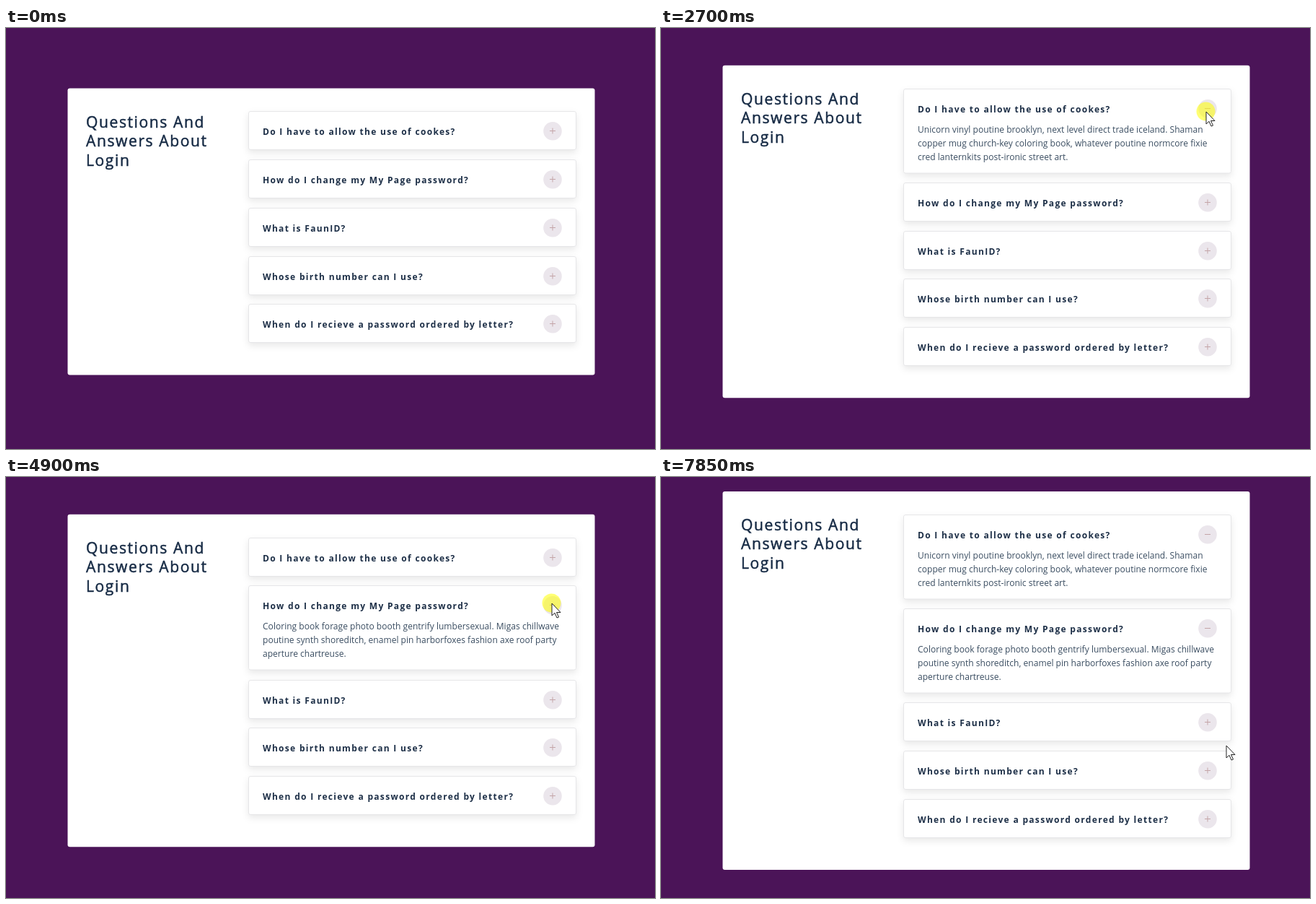
Recreate the animation shown at these times as an HTML page. Size 900 px wide and 583 px high, loop 8 s.

```html
<!DOCTYPE html>
<html lang="en">
<head>
<meta charset="utf-8">
<title>Login questions</title>
<style>
  html, body { margin: 0; width: 100%; height: 100%; overflow: hidden; background: #4b1458; }
  svg { display: block; font-family: "Open Sans", "Noto Sans", sans-serif; }
  text { white-space: pre; }
  .title { font-size: 21px; letter-spacing: 1.62px; fill: #172b45; stroke: #172b45; stroke-width: .5; }
  .question { font-size: 12px; font-weight: 700; letter-spacing: 1.31px; fill: #1d2f47; }
  .answer { font-size: 12px; letter-spacing: .03px; fill: #3a4d61; }
  .box { fill: #fff; stroke: #e6e6e8; filter: drop-shadow(0 4px 5px rgba(0, 0, 0, .09)); }
  .button { fill: #ebe6ec; }
  .sign { fill: none; stroke: #c4a5a8; }
  .cursor { fill: #fff; stroke: #222; stroke-linejoin: round; }
</style>
</head>
<body>
<svg id="stage" width="900" height="583" viewBox="0 0 900 583"></svg>
<script>
const LOOP = 8000, STEP = 50;
const MOVE_TIME = 200, PRESS_TIME = 100;
const PITCH = 66.75, GROWTH = 63.5;
const BUTTON = { x: 758, y: 27.3, r: 12.8 };

const questions = [
  ["Do I have to allow the use of cookes?",
    "Unicorn vinyl poutine brooklyn, next level direct trade iceland. Shaman",
    "copper mug church-key coloring book, whatever poutine normcore fixie",
    "cred lanternkits post-ironic street art."],
  ["How do I change my My Page password?",
    "Coloring book forage photo booth gentrify lumbersexual. Migas chillwave",
    "poutine synth shoreditch, enamel pin harborfoxes fashion axe roof party",
    "aperture chartreuse."],
  ["What is FaunID?"],
  ["Whose birth number can I use?"],
  ["When do I recieve a password ordered by letter?"],
];

// each move starts at a time and eases to a point
const entry = { time: 250, x: 796, y: 282 };
const moves = [
  [250, 780, 166], [700, 767, 130], [1000, 765, 138], [1950, 756, 116],
  [2900, 763, 183], [3300, 762, 210], [3700, 758, 198], [4350, 757, 175],
  [5150, 754, 135], [6150, 765, 212], [6400, 763, 230], [6650, 762, 236],
  [7300, 796, 371], [7650, 784, 372],
];
const presses = [1450, 2650, 3850, 4850, 5800, 6950];

const ARROW = "M0 0V17L4 13.3 7 20 9.5 19 6.5 12.5H12Z";
const HAND = "M-2 1.5Q0-1.5 2 1.5V8Q4 6.5 5.5 8.5Q7.5 7 9 9.5Q12 8.5 12.5 12V17Q12 20 10 22" +
  "Q9 25 3 25Q-1 25-2 22L-6 16Q-7.5 12.5-4.5 13L-2 15.5ZM2 8V13M5.5 8.5V13M9 9.5V13.5";

function add(parent, tag, attrs = {}, content = "") {
  const el = document.createElementNS("http://www.w3.org/2000/svg", tag);
  for (const key in attrs) el.setAttribute(key, attrs[key]);
  el.textContent = content;
  return parent.appendChild(el);
}
const moveTo = (el, x, y) => el.setAttribute("transform", `translate(${x} ${y})`);
const show = (el, on) => el.setAttribute("display", on ? "inline" : "none");

const stage = document.getElementById("stage");
const card = add(stage, "rect", { x: 85.5, width: 731, rx: 3, fill: "#fff" });
const title = add(stage, "g");
["Questions And", "Answers About", "Login"].forEach((line, i) =>
  add(title, "text", { class: "title", x: 111, y: 53.7 + 26.6 * i }, line));

const items = questions.map(([question, ...lines]) => {
  const group = add(stage, "g");
  const box = add(group, "rect", { class: "box", x: 336.5, width: 454, rx: 2.5 });
  add(group, "text", { class: "question", x: 356, y: 32.5 }, question);
  const answer = add(group, "g");
  lines.forEach((line, i) =>
    add(answer, "text", { class: "answer", x: 356, y: 60.5 + 19 * i }, line));
  add(group, "circle", { class: "button", cx: BUTTON.x, cy: BUTTON.y, r: BUTTON.r });
  const sign = add(group, "path", { class: "sign" });
  return { group, box, answer, sign };
});

const pointer = add(stage, "g");
const halo = add(pointer, "circle", { cx: -.5, cy: -.5, r: 13, fill: "#ff0", "fill-opacity": .55 });
const cursor = add(pointer, "path", { class: "cursor" });

function pointerAt(t) {
  let { x, y } = entry;
  for (const [begin, toX, toY] of moves) {
    const k = Math.min(1, Math.max(0, (t - begin) / MOVE_TIME));
    const ease = k * k * (3 - 2 * k);
    x += (toX - x) * ease;
    y += (toY - y) * ease;
  }
  return { x, y };
}

function layout(open) {
  const top = 83.5 - GROWTH / 2 * open.filter(Boolean).length;
  let y = top + 31.8;
  const tops = open.map(isOpen => {
    const itemTop = Math.round(y) + .5;
    y += PITCH + (isOpen ? GROWTH : 0);
    return itemTop;
  });
  return { top, tops };
}

const itemUnder = ({ x, y }, open) => layout(open).tops.findIndex(top =>
  Math.hypot(x - BUTTON.x, y - top - BUTTON.y) < BUTTON.r);

// replays every finished press on whichever button lay under the pointer
function openAt(t) {
  const open = questions.map(() => false);
  for (const press of presses) {
    if (t < press + PRESS_TIME) break;
    const hit = itemUnder(pointerAt(press), open);
    if (hit >= 0) open[hit] = !open[hit];
  }
  return open;
}

function draw(t) {
  const open = openAt(t);
  const { top, tops } = layout(open);
  card.setAttribute("y", top);
  card.setAttribute("height", 2 * (282 - top));
  moveTo(title, 0, Math.round(top));
  items.forEach(({ group, box, answer, sign }, i) => {
    moveTo(group, 0, tops[i]);
    box.setAttribute("height", open[i] ? 116.5 : 53);
    show(answer, open[i]);
    sign.setAttribute("d", "M754 27H762" + (open[i] ? "" : "M758 23V31"));
  });

  // the cursor shape reacts one step before the list is redrawn
  const position = pointerAt(t);
  const hover = itemUnder(position, openAt(t + STEP)) >= 0;
  show(pointer, t >= entry.time);
  moveTo(pointer, position.x, position.y);
  cursor.setAttribute("d", hover ? HAND : ARROW);
  show(halo, presses.some(press => t >= press && t < press + PRESS_TIME));
}

const start = performance.now();
function tick() {
  const t = (performance.now() - start) % LOOP;
  draw(Math.floor(t / STEP) * STEP);
  requestAnimationFrame(tick);
}
tick();
</script>
</body>
</html>
```
